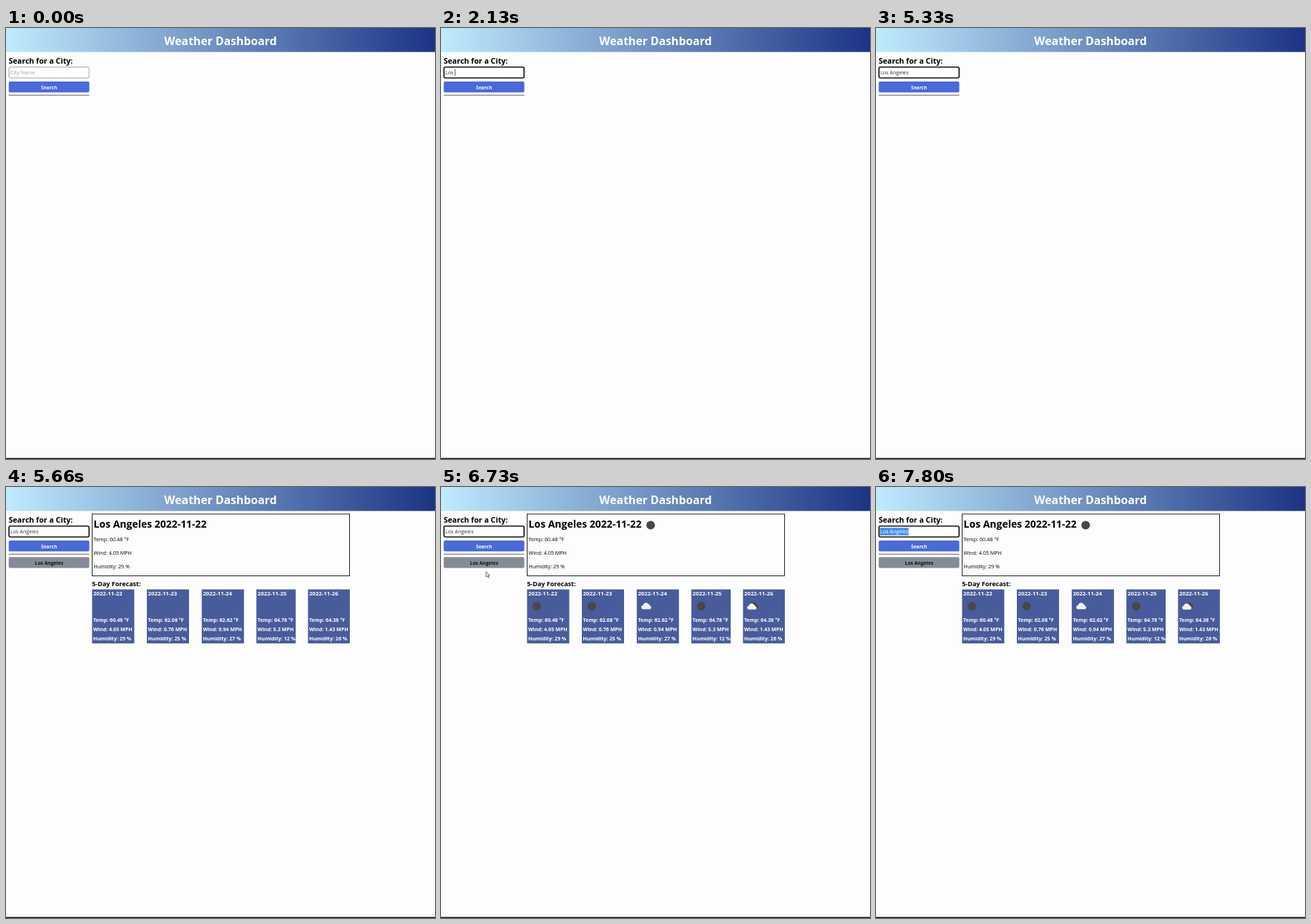
An HTML page for the animation above (8 s loop, 600x604 px).

```html
<!DOCTYPE html>
<html lang="en">
<head>
<meta charset="utf-8">
<title>Weather Dashboard</title>
<style>
  html, body { margin: 0; width: 100%; height: 100%; overflow: hidden; background: #fdfdfd; }
  svg { display: block; width: 600px; height: 604px; }
  text { font-family: "Open Sans", "Noto Sans", sans-serif; font-size: 7.2px; white-space: pre; }
  .bold { font-weight: 700; }
  .mid { text-anchor: middle; }
  .white { fill: #fff; }
</style>
</head>
<body>
<svg viewBox="0 0 600 604">
  <defs>
    <linearGradient id="sky">
      <stop offset="0" stop-color="#c0ebfd"/>
      <stop offset="1" stop-color="#1c3384"/>
    </linearGradient>
    <path id="cloud" d="M-5 5a3 3 0 0 1 -.3-6a4.6 4.6 0 0 1 8.6-1.6a2.6 2.6 0 0 1 2 2.4a2.7 2.7 0 0 1 0 5.2z"/>
  </defs>
  <rect width="600" height="604" fill="#fdfdfd"/>
  <rect width="600" height="33.6" fill="url(#sky)"/>
  <text class="bold mid white" x="300" y="24" style="font-size:15.8px">Weather Dashboard</text>
  <rect y="602.6" width="600" height="1.4" fill="#111"/>

  <text class="bold" x="3.7" y="50" style="font-size:10.65px">Search for a City:</text>
  <rect id="field" x="4.2" y="54.8" width="112" height="15.2" rx="2" fill="#fff"/>
  <rect id="highlight" y="57.2" height="10.6" fill="#4390f6"/>
  <text id="hint" x="6" y="65.3" fill="#a3a3a3">City Name</text>
  <text id="value" x="6" y="65.3" fill="#333"><tspan id="plain"></tspan><tspan id="picked" fill="#fff"></tspan></text>
  <rect id="caret" y="57.5" width=".8" height="9.6" fill="#222"/>
  <rect x="3.8" y="75" width="112.7" height="15.2" rx="2" fill="#4a69da"/>
  <text class="bold mid white" x="60.2" y="85.5" style="font-size:6.7px">Search</text>
  <rect x="3.8" y="93.7" width="112.7" height="1" fill="#5d5d70"/>

  <g id="results">
    <rect x="3.8" y="98.2" width="112.7" height="15.4" rx="2" fill="#868b98"/>
    <text class="bold mid" x="60.3" y="108.7" fill="#111" style="font-size:6.75px">Los Angeles</text>
    <rect x="120.5" y="37.9" width="360" height="86.6" fill="none" stroke="#222"/>
    <text class="bold" x="122.6" y="57" style="font-size:13.97px">Los Angeles 2022-11-22</text>
    <text x="122.6" y="76.4">Temp: 60.48 °F</text>
    <text x="122.6" y="95.2">Wind: 4.05 MPH</text>
    <text x="122.6" y="114">Humidity: 29 %</text>
    <text class="bold" x="120.2" y="138.6" style="font-size:9px">5-Day Forecast:</text>
    <g id="cards"></g>
  </g>
  <g id="icons"><circle cx="293.2" cy="53.6" r="6" fill="#484848"/></g>

  <path id="arrow" d="M0 0V7.4L1.7 5.9L2.9 8.5L4.1 8L3 5.4H5.2Z" fill="#fff" stroke="#333" stroke-width=".7"/>
  <path id="beam" d="M-1.3-4H1.3M0-4V4M-1.3 4H1.3" fill="none" stroke="#555" stroke-width=".7"/>
</svg>
<script>
const LOOP = 8000;
const CITY = 'Los Angeles';
const FOCUS = 730, RESULTS = 5660, ICONS = 5730;
const KEYS = [1660, 1860, 1930, 2130, 2460, 2660, 2860, 3000, 3460, 3530, 3730];
const BLINKS = [1600, 1660, 4260, 4800, 5330, 5860, 6390, 6920];
const DRAG = 7130;

// Pointer stops: time, x, y
const VISITS = [
  [[60, 80, 112], [330, 60, 63], [730, 60, 63], [1000, 68.6, 48.6], [1130, 71, 45], [1660, 71, 45]],
  [[6060, 71, 45], [6400, 67, 92], [6730, 63, 118.6], [6860, 62, 119], [DRAG, 50, 63], [7460, 6, 63], [LOOP, 6, 63]]
];

const FORECAST = [
  [120.4, 59, '2022-11-22', 'moon', 60.48, 4.05, 29],
  [197, 59, '2022-11-23', 'moon', 62.08, 0.76, 25],
  [273.8, 59, '2022-11-24', 'cloud', 62.62, 0.94, 27],
  [350.2, 55, '2022-11-25', 'moon', 64.78, 5.3, 12],
  [422.4, 58.5, '2022-11-26', 'clouds', 64.38, 1.43, 26]
];

const $ = id => document.getElementById(id);
const show = (id, on) => $(id).style.display = on ? '' : 'none';
const set = (id, attrs) => {
  for (const name in attrs) $(id).setAttribute(name, attrs[name]);
};

const label = (x, y, size, text) =>
  `<text class="bold white" x="${x}" y="${y}" style="font-size:${size}px">${text}</text>`;

const cloud = (x, y, fill, scale = 1) =>
  `<use href="#cloud" transform="translate(${x} ${y}) scale(${scale})" fill="${fill}"/>`;

const icon = {
  moon: x => `<circle cx="${x}" cy="167" r="6" fill="#484848"/>`,
  cloud: x => cloud(x, 166.7, '#f1f1f1', .9),
  clouds: x => cloud(x + 2.6, 165.4, '#484848', .75) + cloud(x - 1, 167.4, '#f1f1f1', .85)
};

for (const [x, width, date, sky, temp, wind, humidity] of FORECAST) {
  const left = x + 1.6;
  $('cards').innerHTML +=
    `<rect x="${x}" y="143.5" width="${width}" height="75.7" fill="#485c9b"/>` +
    label(left, 152, 7.8, date) +
    label(left, 188.6, 7.1, `Temp: ${temp} °F`) +
    label(left, 201.6, 7.1, `Wind: ${wind} MPH`) +
    label(left, 214.7, 7.1, `Humidity: ${humidity} %`);
  $('icons').innerHTML += icon[sky](x + 13.7);
}

function pointerAt(t) {
  for (const stops of VISITS) {
    for (let i = 1; i < stops.length; i++) {
      const [t0, x0, y0] = stops[i - 1], [t1, x1, y1] = stops[i];
      if (t < t0 || t >= t1) continue;
      const p = (t - t0) / (t1 - t0), k = p * p * (3 - 2 * p);
      return { x: x0 + (x1 - x0) * k, y: y0 + (y1 - y0) * k };
    }
  }
  return null;
}

function drawField(t, pointer) {
  const focused = t >= FOCUS;
  set('field', { stroke: focused ? '#111' : '#8a8a8a', 'stroke-width': focused ? 1.6 : .8 });

  const typed = CITY.slice(0, KEYS.filter(k => t >= k).length);
  show('hint', !typed);
  $('plain').textContent = typed;
  $('picked').textContent = '';

  const end = 6 + $('plain').getComputedTextLength();
  let start = typed.length;
  if (t >= DRAG) {
    while (start > 0 && $('value').getStartPositionOfChar(start - 1).x >= pointer.x - 1) start--;
  }
  $('plain').textContent = typed.slice(0, start);
  $('picked').textContent = typed.slice(start);

  const edge = 6 + (start ? $('plain').getComputedTextLength() : 0);
  set('highlight', { x: edge, width: Math.max(0, end - edge) });
  set('caret', { x: end });
  const lit = BLINKS.filter(b => t >= b).length % 2 === 0;
  show('caret', focused && lit && start === typed.length);
}

function drawPointer(pointer) {
  const overField = pointer && pointer.x < 116 && pointer.y > 54 && pointer.y < 70;
  show('arrow', pointer && !overField);
  show('beam', overField);
  if (pointer) set(overField ? 'beam' : 'arrow', { transform: `translate(${pointer.x} ${pointer.y})` });
}

function draw() {
  const t = performance.now() % LOOP;
  const pointer = pointerAt(t);
  drawField(t, pointer);
  drawPointer(pointer);
  show('results', t >= RESULTS);
  show('icons', t >= ICONS);
  requestAnimationFrame(draw);
}
draw();
</script>
</body>
</html>
```
